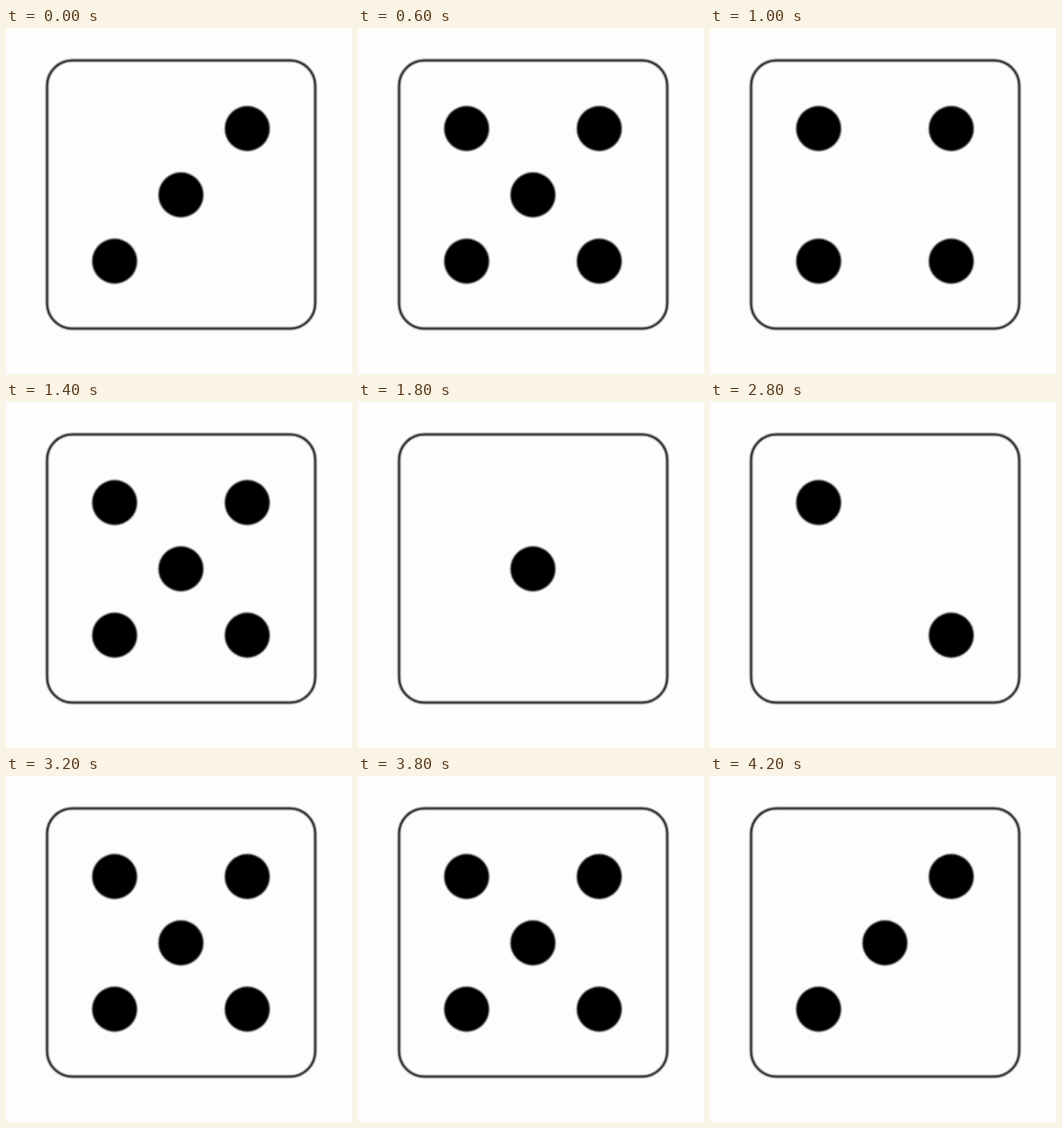
Write an HTML page that moves like this. It is 480 px wide and 480 px high and loops after 4300 ms.

```html
<!DOCTYPE html>
<html lang="en">
<head>
<meta charset="utf-8">
<title>Rolling die</title>
<style>
  html, body { margin: 0; width: 100%; height: 100%; overflow: hidden; background: #fdfdfd; }
  svg { display: block; width: 100%; height: 100%; }
</style>
</head>
<body>
<svg viewBox="0 0 480 480">
  <defs>
    <filter id="soft" filterUnits="userSpaceOnUse" x="0" y="0" width="480" height="480"
            color-interpolation-filters="sRGB">
      <feGaussianBlur stdDeviation="0.9"/>
    </filter>
  </defs>
  <g filter="url(#soft)">
    <rect x="57" y="45" width="372" height="372" rx="35" fill="none" stroke="#000" stroke-width="3"/>
    <g id="pips"></g>
  </g>
</svg>
<script>
const LOOP = 4300;
const HOLD = 200;
const ROLLS = '3415146561455123551523';
const CENTER = { x: 242.7, y: 231.5 };
const GAP = 92;
const RADIUS = 31.2;

// Which faces show the pip at this column and row, each from -1 to 1
function shows(face, col, row) {
  if (col === 0) return row === 0 && face % 2 === 1;
  if (row === 0) return face === 6;
  return col === row ? face !== 1 && face !== 3 : face > 2;
}

const group = document.getElementById('pips');
const pips = [];
for (let row = -1; row <= 1; row++) {
  for (let col = -1; col <= 1; col++) {
    const dot = document.createElementNS('http://www.w3.org/2000/svg', 'circle');
    dot.setAttribute('cx', CENTER.x + col * GAP);
    dot.setAttribute('cy', CENTER.y + row * GAP);
    dot.setAttribute('r', RADIUS);
    group.append(dot);
    pips.push({ dot, col, row });
  }
}

function draw(time) {
  const face = Number(ROLLS[Math.floor(time / HOLD)]);
  for (const { dot, col, row } of pips) {
    dot.style.display = shows(face, col, row) ? '' : 'none';
  }
}

const begin = performance.now();
function tick() {
  draw((performance.now() - begin) % LOOP);
  requestAnimationFrame(tick);
}
tick();
</script>
</body>
</html>
```
